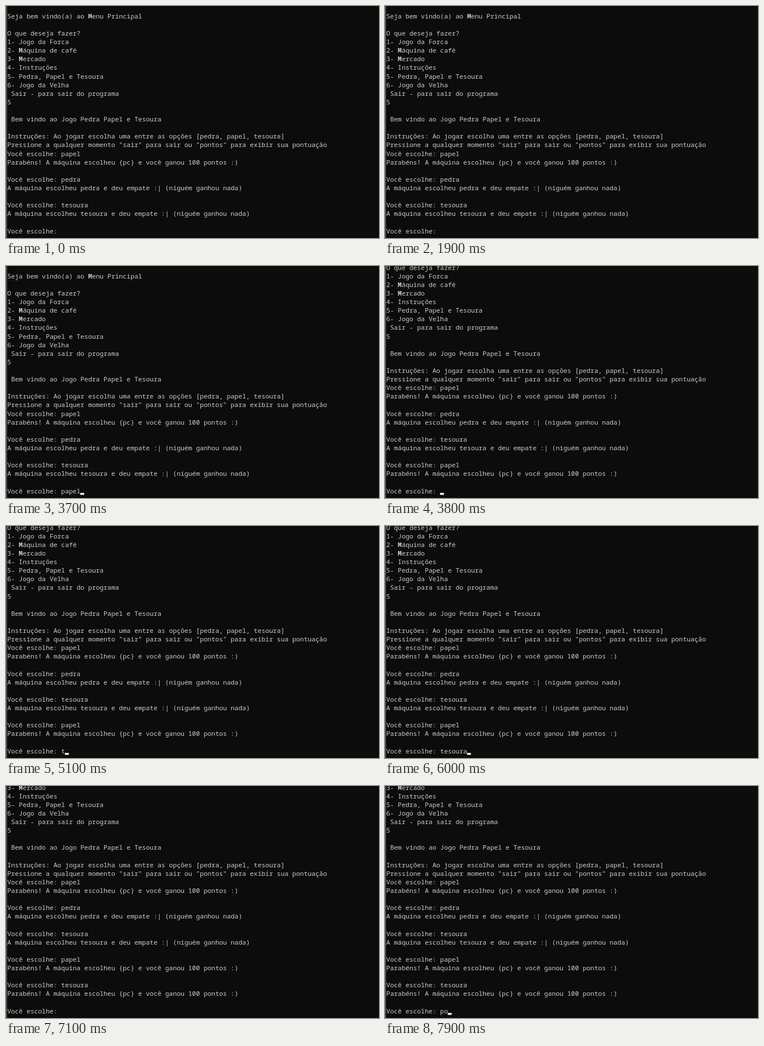
Animation, 658 px wide and 408 px high, one loop 8 s. Source, as an HTML page with a canvas:

```html
<!DOCTYPE html>
<html lang="pt">
<head>
<meta charset="utf-8">
<title>Terminal</title>
<style>
  html, body { margin: 0; width: 100%; height: 100%; overflow: hidden; background: #0c0c0c; }
  canvas { display: block; }
</style>
</head>
<body>
<canvas id="screen" width="658" height="408"></canvas>
<script>
const ctx = document.getElementById('screen').getContext('2d');
const LOOP = 8000;
const CELL = 6.795, ROW = 15.12, LEFT = 2, BASE = 399.68;
const FONT = '11.4px "Noto Sans Mono", "DejaVu Sans Mono", monospace';
const PROMPT = 'Você escolhe: ';

const WIN = 'Parabéns! A máquina escolheu {pc} e você ganou 100 pontos :)';
const tie = pick => `A máquina escolheu ${pick} e deu empate :| (niguém ganhou nada)`;
const round = (pick, result) => [PROMPT + pick, result, ''];

const intro = [
  'Seja bem vindo(a) ao Menu Principal',
  '',
  'O que deseja fazer?',
  '1- Jogo da Forca',
  '2- Máquina de café',
  '3- Mercado',
  '4- Instruções',
  '5- Pedra, Papel e Tesoura',
  '6- Jogo da Velha',
  ' Sair - para sair do programa',
  '5',
  '',
  ' Bem vindo ao Jogo Pedra Papel e Tesoura',
  '',
  'Instruções: Ao jogar escolha uma entre as opções [pedra, papel, tesoura]',
  'Pressione a qualquer momento "sair" para sair ou "pontos" para exibir sua pontuação',
  ...round('papel', WIN),
  ...round('pedra', tie('pedra')),
  ...round('tesoura', tie('tesoura'))
];
const second = [...intro, ...round('papel', WIN)];
const third = [...second, ...round('tesoura', WIN)];

// [start ms, history, typed text]; a trailing "_" is the visible cursor
const steps = [
  [0, intro, ''], [1400, intro, '_'], [1900, intro, ''],
  [2100, intro, 'p_'], [2200, intro, 'pa_'], [2300, intro, 'pap_'],
  [2400, intro, 'pa_'], [2900, intro, 'pa'],
  [3500, intro, 'pap_'], [3600, intro, 'pape_'], [3700, intro, 'papel_'],
  [3800, second, '_'], [4500, second, ''],
  [4800, second, 't_'], [5300, second, 't'],
  [5600, second, 'te_'], [5700, second, 'tes_'], [5800, second, 'teso_'],
  [5900, second, 'tesour_'], [6000, second, 'tesoura_'],
  [6200, third, '_'], [7100, third, ''],
  [7500, third, 'p_'], [7800, third, 'po_']
];

function drawLine(text, y) {
  ctx.fillStyle = '#cccccc';
  [...text].forEach((ch, i) => {
    ctx.font = (ch === 'M' ? '600 ' : '300 ') + FONT;
    ctx.fillText(ch, LEFT + i * CELL + 0.2, y);
  });
}

function draw(t) {
  const [, history, input] = steps.findLast(s => s[0] <= t);
  const typed = input.replace('_', '');
  ctx.fillStyle = '#0c0c0c';
  ctx.fillRect(0, 0, 658, 408);
  ctx.fillStyle = '#4c4c4c';
  ctx.fillRect(0, 0, 2, 408);

  const lines = [...history, PROMPT + typed];
  lines.forEach((line, i) => {
    const y = Math.round(BASE - (history.length - i) * ROW);
    if (y > -4) drawLine(line, y);
  });

  if (input.endsWith('_')) {
    ctx.fillStyle = '#f2f2f2';
    ctx.fillRect(LEFT + (PROMPT.length + typed.length) * CELL, 399, CELL, 3.5);
  }
}

function tick(now) {
  draw(now % LOOP);
  requestAnimationFrame(tick);
}
draw(0);
requestAnimationFrame(tick);
</script>
</body>
</html>
```
